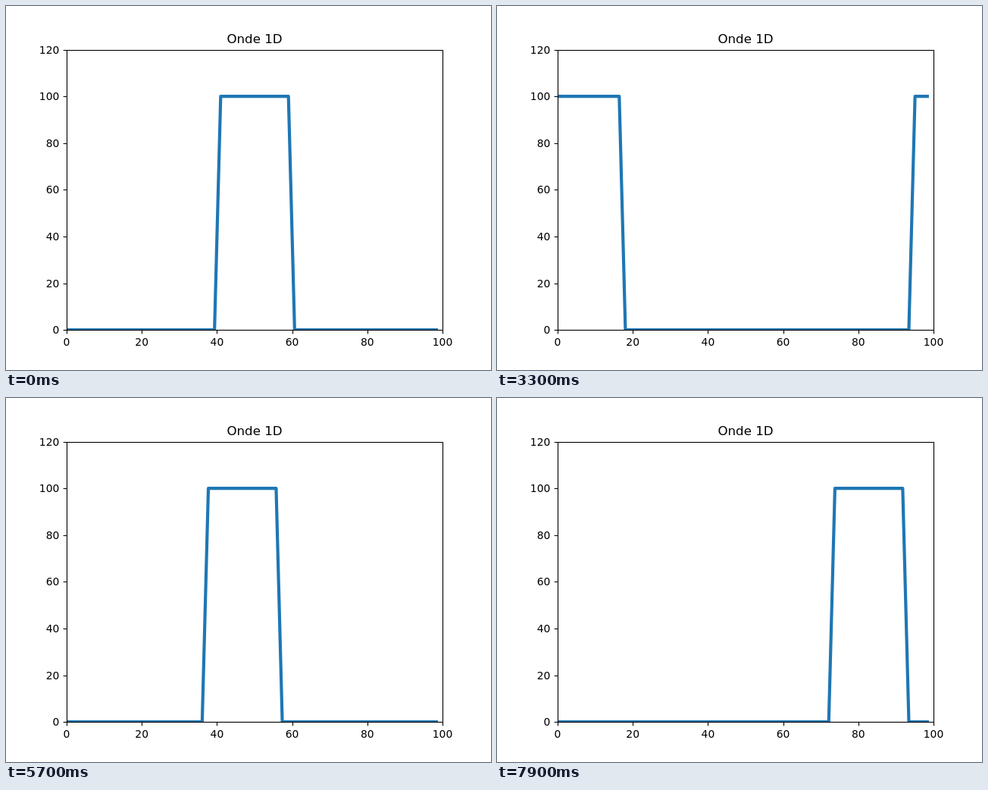
Animation, 640 px wide and 480 px high, one loop 8000 ms. Source, as an HTML page with a canvas:

```html
<!DOCTYPE html>
<html lang="fr">
<head>
<meta charset="utf-8">
<title>Onde 1D</title>
<style>
  html, body { margin: 0; width: 640px; height: 480px; overflow: hidden; background: #fff; }
  canvas { display: block; }
</style>
</head>
<body>
<canvas id="plot" width="640" height="480"></canvas>
<script>
const ctx = document.getElementById('plot').getContext('2d');
const LEFT = 80, RIGHT = 576, TOP = 57.6, BOTTOM = 427.2;
const CELLS = 61, PERIOD = 59, START = 25, WIDTH = 12;
const STEP_MS = 100, STEPS = 80;
const FONT = '"DejaVu Sans", sans-serif';

const px = x => LEFT + x * (RIGHT - LEFT) / 100;
const py = y => BOTTOM - y * (BOTTOM - TOP) / 120;
const snap = v => Math.round(v) + 0.5;

// Square pulse moving one cell per step, wrapping around
function wave(k, n) {
  const d = (((k - START - n) % PERIOD) + PERIOD) % PERIOD;
  return d < WIDTH ? 100 : 0;
}

function segment(x1, y1, x2, y2) {
  ctx.beginPath();
  ctx.moveTo(x1, y1);
  ctx.lineTo(x2, y2);
  ctx.stroke();
}

function label(text, x, y, size, align) {
  ctx.font = size + 'px ' + FONT;
  ctx.textAlign = align;
  ctx.fillText(text, x, y);
}

function drawCurve(n) {
  ctx.save();
  ctx.beginPath();
  ctx.rect(LEFT, 58, RIGHT - LEFT, 370);
  ctx.clip();
  ctx.strokeStyle = '#1f77b4';
  ctx.lineWidth = 4.17;
  ctx.lineJoin = 'round';
  ctx.lineCap = 'square';
  ctx.beginPath();
  for (let k = 0; k < CELLS; k++) ctx.lineTo(px(k * 100 / CELLS), py(wave(k, n)));
  ctx.stroke();
  ctx.restore();
}

function drawAxes() {
  ctx.strokeStyle = ctx.fillStyle = '#000';
  ctx.lineWidth = 1.11;
  ctx.lineCap = 'butt';
  const x0 = snap(LEFT), y0 = snap(BOTTOM);
  ctx.strokeRect(x0, snap(TOP), snap(RIGHT) - x0, snap(BOTTOM) - snap(TOP));
  for (let v = 0; v <= 100; v += 20) {
    const x = snap(px(v));
    segment(x, y0, x, y0 + 4.86);
    label(v, px(v), 448, 13.89, 'center');
  }
  for (let v = 0; v <= 120; v += 20) {
    const y = snap(py(v));
    segment(x0, y, x0 - 4.86, y);
    label(v, 70.3, Math.round(py(v) + 5), 13.89, 'right');
  }
  label('Onde 1D', (LEFT + RIGHT) / 2, 49, 16.67, 'center');
}

function frame() {
  const n = Math.floor(performance.now() / STEP_MS) % STEPS;
  ctx.fillStyle = '#fff';
  ctx.fillRect(0, 0, 640, 480);
  drawCurve(n);
  drawAxes();
  requestAnimationFrame(frame);
}
frame();
</script>
</body>
</html>
```
